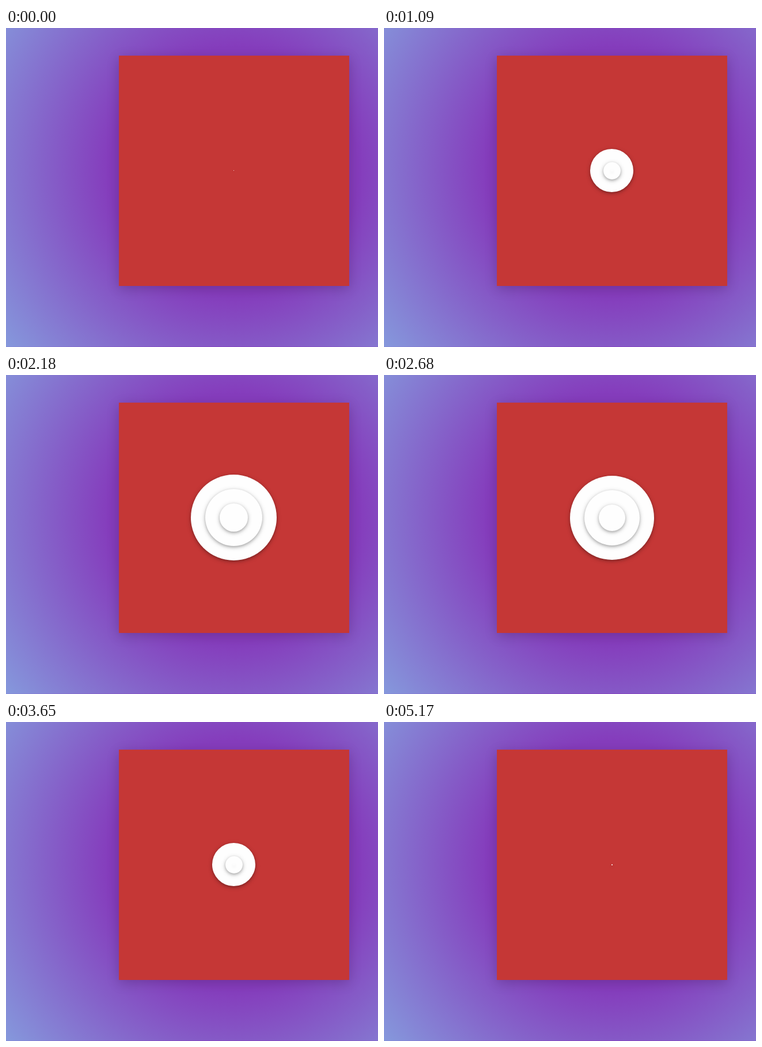
Animation of 646 by 554 pixels, one loop 5.24 s. Source, as an HTML page:

```html
<!DOCTYPE html>
<html lang="en">
<head>
<meta charset="utf-8">
<title>Pulsing discs</title>
<style>
html, body { margin: 0; width: 100%; height: 100%; overflow: hidden; }
body {
  position: relative;
  background: radial-gradient(circle at 396px 248px, #853cbc 215px, #8598dc 500px) 0 0 / 100% 553px;
}
#card {
  position: absolute; left: 196px; top: 48px; width: 400px; height: 400px;
  background: #c53736;
  box-shadow: 0 5px 20px rgba(0, 0, 0, .18);
}
.disc {
  position: absolute; border-radius: 50%; background: #fefefe;
  box-shadow: 0 2px 5px rgba(0, 0, 0, .26), 0 2px 10px rgba(0, 0, 0, .16);
}
</style>
</head>
<body>
<div id="card"></div>
<script>
const LOOP = 5240, CYCLE = 5117;
const PEAK_START = 2304, PEAK_END = 2439;
const card = document.getElementById('card');

// Full diameter and the time each disc takes to grow or shrink.
const discs = [[150, 2430], [100, 1930], [50, 1410]].map(([size, span]) => {
  const el = document.createElement('div');
  el.className = 'disc';
  card.append(el);
  return { el, size, span };
});

function draw(now) {
  let t = now % LOOP;
  if (t > 4960) t -= CYCLE; // the next growth begins just before the loop ends
  const away = Math.max(0, PEAK_START - t, t - PEAK_END);
  for (const { el, size, span } of discs) {
    const u = Math.min(1, away / span);
    const d = Math.round(size * (1 + Math.cos(Math.PI * u)) / 2);
    el.style.display = d ? 'block' : 'none';
    el.style.width = el.style.height = d + 'px';
    el.style.left = el.style.top = Math.floor(200 - d / 2) + 'px';
  }
}

const start = performance.now();
function tick() {
  draw(performance.now() - start);
  requestAnimationFrame(tick);
}
tick();
</script>
</body>
</html>
```
